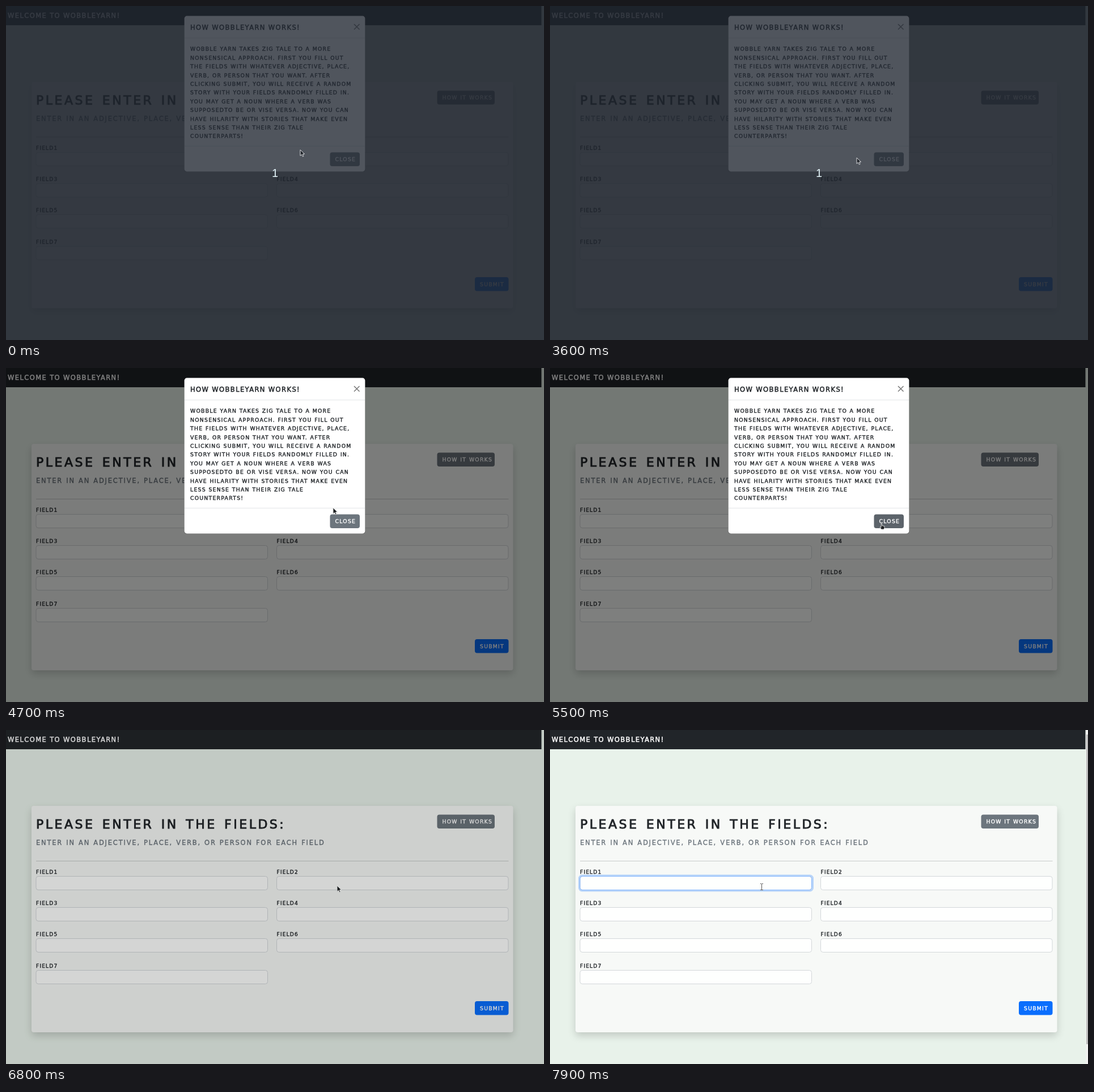
An HTML page with a canvas that plays this animation: 949 by 590 pixels, repeating every 8000 ms.

```html
<!DOCTYPE html>
<html lang="en">
<head>
<meta charset="utf-8">
<title>Word game form</title>
<style>
html, body { margin: 0; width: 100%; height: 100%; overflow: hidden; background: #e8f2ea; }
canvas { display: block; }
</style>
</head>
<body>
<canvas id="stage" width="949" height="590"></canvas>
<script>
const W = 949, H = 590, LOOP = 8000, STEP = 100;
const ctx = document.getElementById('stage').getContext('2d');
const SANS = '"DejaVu Sans", Verdana, sans-serif';

// Type styles: letter and word spacing in pixels, extra outline weight
const TYPE = {
  title: { font: `22px ${SANS}`, gap: 3.5, word: 3, weight: 0.9 },
  head: { font: `11.5px ${SANS}`, gap: 1.4, word: 0, weight: 0.5 },
  lead: { font: `11.5px ${SANS}`, gap: 1.8, word: 0.7, weight: 0.35 },
  body: { font: `9.3px ${SANS}`, gap: 1.25, word: 0.4, weight: 0.4 },
  label: { font: `9px ${SANS}`, gap: 1.2, word: 0, weight: 0.4 }
};

const STORY = [
  'Wobble Yarn takes Zig Tale to a more',
  'nonsensical approach. First you fill out',
  'the fields with whatever adjective, place,',
  'verb, or person that you want. After',
  'clicking submit, you will receive a random',
  'story with your fields randomly filled in.',
  'You may get a noun where a verb was',
  'supposedto be or vise versa. Now you can',
  'have hilarity with stories that make even',
  'less sense than their Zig Tale',
  'counterparts!'
];

// Pointer path: time, x, y
const PATH = [
  [0, 519, 254], [400, 515, 259], [2100, 515, 259], [2200, 515, 262],
  [2300, 516, 256], [2600, 526, 271], [3500, 526, 271], [4000, 599, 258],
  [4200, 599, 258], [4600, 579, 247], [4700, 577, 247], [5000, 577, 247],
  [5500, 584, 275], [6800, 584, 275], [7400, 372, 281], [7700, 372, 281],
  [7900, 373, 277]
];

const clamp = v => Math.max(0, Math.min(1, v));
const mix = (a, b, k) => a + (b - a) * k;

function pointer(t) {
  const i = PATH.findIndex(p => p[0] > t);
  if (i < 0) return PATH[PATH.length - 1].slice(1);
  const a = PATH[i - 1], b = PATH[i];
  const k = (t - a[0]) / (b[0] - a[0]);
  return [mix(a[1], b[1], k), mix(a[2], b[2], k)];
}

function text(str, x, y, style, color) {
  const s = TYPE[style];
  ctx.font = s.font;
  ctx.letterSpacing = s.gap + 'px';
  ctx.wordSpacing = s.word + 'px';
  ctx.fillStyle = ctx.strokeStyle = color;
  ctx.lineWidth = s.weight;
  ctx.fillText(str.toUpperCase(), x, y);
  ctx.strokeText(str.toUpperCase(), x, y);
}

function rect(x, y, w, h, color) {
  ctx.fillStyle = color;
  ctx.fillRect(x, y, w, h);
}

function box(x, y, w, h, r, fill, line, width = 1) {
  ctx.beginPath();
  ctx.roundRect(x, y, w, h, r);
  if (fill) {
    ctx.fillStyle = fill;
    ctx.fill();
  }
  if (line) {
    ctx.strokeStyle = line;
    ctx.lineWidth = width;
    ctx.stroke();
  }
}

function button(label, x, y, w, color) {
  box(x, y, w, 24.5, 4, color);
  text(label, x + 9, y + 15.8, 'body', '#fff');
}

function page(focus, caret, bar) {
  rect(0, 0, W, H, '#e8f2ea');
  rect(0, 0, 944.5, 34, '#212529');
  text('Welcome to Wobbleyarn!', 3, 21, 'head', '#fff');

  ctx.save();
  ctx.shadowColor = 'rgba(0,0,0,.17)';
  ctx.shadowBlur = 14;
  ctx.shadowOffsetY = 6;
  box(45, 134, 849.5, 400, 4, '#f7f9f7');
  ctx.restore();

  text('Please enter in the fields:', 53, 174, 'title', '#212529');
  text('Enter in an adjective, place, verb, or person for each field',
    53, 203, 'lead', '#6c757d');
  rect(53, 231, 833.5, 1, '#c9cccb');

  for (let i = 0; i < 7; i++) {
    const x = i % 2 ? 477.5 : 53;
    const y = 258 + 55.2 * (i >> 1);
    text('Field' + (i + 1), x, y - 4, 'label', '#212529');
    box(x, Math.round(y) + 0.5, 408.5, 24, 4, '#fefffe', '#d3d7da');
  }
  button('How it works', 760.5, 149.5, 101.5, '#6c757d');
  button('Submit', 827, 479, 59.5, '#0a6efd');

  if (focus) {
    box(51.5, 257, 412, 27, 5, null, `rgba(13,110,253,${0.27 * focus})`, 3);
    box(53, 258.5, 408.5, 24, 4, null, `rgba(134,183,254,${focus})`);
  }
  if (caret) rect(61, 264, 1, 13, '#212529');
  if (bar) {
    rect(945, 0, 4, H, '#f0f1f0');
    rect(946, 8, 3, 547, '#bcbcbc');
  }
}

function modal(hover) {
  box(314, 17, 320, 276, 5, 'rgba(0,0,0,.2)');
  box(314.6, 17.6, 318.8, 274.8, 4.5, '#fff');
  text('How Wobbleyarn works!', 325, 41.5, 'head', '#212529');
  ctx.strokeStyle = '#777';
  ctx.lineWidth = 1.5;
  ctx.beginPath();
  ctx.moveTo(614, 32);
  ctx.lineTo(623.5, 41.5);
  ctx.moveTo(623.5, 32);
  ctx.lineTo(614, 41.5);
  ctx.stroke();
  rect(315, 56, 318, 1, '#e3e6e8');
  STORY.forEach((line, i) => text(line, 325, 79.4 + 15.4 * i, 'body', '#212529'));
  rect(315, 247, 318, 1, '#e3e6e8');
  button('Close', 571.5, 258.5, 52.5, hover ? '#5c636a' : '#6c757d');
}

function shape(points, fill, line) {
  ctx.beginPath();
  points.forEach(p => ctx.lineTo(...p));
  ctx.closePath();
  ctx.fillStyle = fill;
  ctx.fill();
  ctx.strokeStyle = line;
  ctx.lineWidth = 1;
  ctx.stroke();
}

function arrow(fill, line) {
  shape([[0, 0], [0, 10.5], [2.5, 8.3], [4.3, 12], [6, 11.2], [4.4, 7.7], [7.6, 7.4]], fill, line);
}

function hand() {
  shape([[0, 0], [1.6, 0], [1.6, 3.5], [6, 4.5], [6, 7.5], [4.8, 10], [0.5, 10],
    [-2, 6.5], [-1.5, 5.5], [0, 6.5]], '#1b1d1f', '#d5d7d6');
}

function beam() {
  rect(0, -5, 1, 11, '#555');
  for (const y of [-6, 5]) {
    rect(-2, y, 2, 1, '#555');
    rect(1, y, 2, 1, '#555');
  }
}

function draw(t) {
  const waiting = t < 4700;
  const dim = t < 6800 ? 0.5 : t < 6900 ? 0.165 : 0;
  const [x, y] = pointer(t);
  const hover = !waiting && t < 6700 && x > 571 && x < 624 && y > 258;

  page(clamp((t - 7350) / 100), t >= 7400 && t < 7900, t >= 6900);
  rect(0, 0, W, H, `rgba(0,0,0,${dim})`);

  if (t < 6700) {
    const leave = t < 6600 ? 0 : 0.5;
    ctx.save();
    ctx.globalAlpha = 1 - leave;
    ctx.translate(0, -30 * leave);
    modal(hover);
    ctx.restore();
  }

  if (waiting) {
    rect(0, 0, W, H, 'rgba(34,40,50,.79)');
    ctx.font = '20px "Liberation Sans", Arial, sans-serif';
    ctx.letterSpacing = ctx.wordSpacing = '0px';
    ctx.textAlign = 'center';
    ctx.fillStyle = '#e4f5fa';
    ctx.fillText('1', 474.5, 302);
    ctx.textAlign = 'left';
  }

  ctx.save();
  ctx.translate(Math.round(x), Math.round(y));
  const inField = t >= 6900 && (x > 477 || x < 462);
  if (hover) hand();
  else if (inField) beam();
  else if (waiting) arrow('#22262c', '#d8dadd');
  else arrow('#1b1d1f', '#d5d7d6');
  ctx.restore();
}

const start = performance.now();
function tick() {
  const t = (performance.now() - start) % LOOP;
  draw(Math.floor(t / STEP) * STEP);
  requestAnimationFrame(tick);
}
tick();
</script>
</body>
</html>
```
